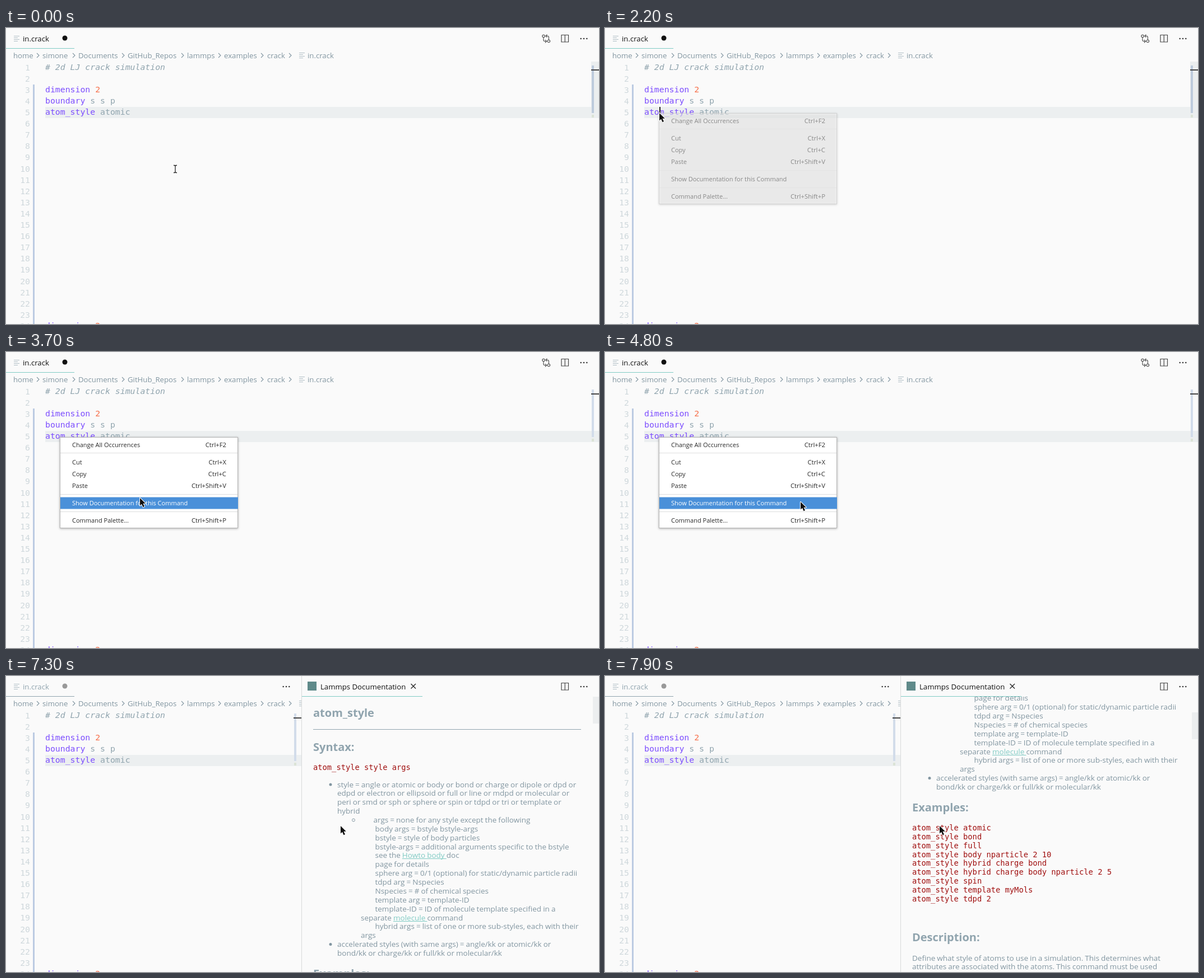
An HTML page with a canvas that plays this animation: 1058 by 529 pixels, repeating every 8000 ms.

```html
<!DOCTYPE html>
<html lang="en">
<head>
<meta charset="utf-8">
<title>Editor documentation panel</title>
<style>
html, body { margin: 0; height: 100%; overflow: hidden; background: #fafafa; }
canvas { display: block; width: 100vw; height: 100vh; }
</style>
</head>
<body>
<canvas id="stage" width="1058" height="529"></canvas>
<script>
const ctx = document.getElementById('stage').getContext('2d');
const LOOP = 8000, W = 1058, H = 529, SPLIT = 528;
const LINE = 20.1, TOP = 60.5, DOC_LINE = 15.87;
const BG = '#fafafa', GRAY = '#90a4ae', SLATE = '#8296a1', TEAL = '#80cbc4',
  PURPLE = '#7c4dff', ORANGE = '#f76d47', RED = '#a01010', DARK = '#333', ICON = '#444';
const SANS = '"Open Sans", "Noto Sans", sans-serif', MONO = '"DejaVu Sans Mono", monospace';
const UI = `13.2px ${SANS}`, BODY = `13.5px ${SANS}`, HEAD = `bold 20px ${SANS}`,
  CODE = `14.82px ${MONO}`, DOC_CODE = `13.75px ${MONO}`;

const crumbs = [[13, 'home'], [65, 'simone'], [129, 'Documents'], [217, 'GitHub_Repos'],
  [323, 'lammps'], [389, 'examples'], [466, 'crack'], [538, 'in.crack']];
const chevrons = [57, 121, 209, 315, 381, 457, 507];

const menu = [[166, 'Change All Occurrences', 'Ctrl+F2'], [197, 'Cut', 'Ctrl+X'],
  [218, 'Copy', 'Ctrl+C'], [239, 'Paste', 'Ctrl+Shift+V'],
  [270, 'Show Documentation for this Command', ''], [301, 'Command Palette...', 'Ctrl+Shift+P']];

// Square brackets mark links.
const syntax = [
  [591, 'style = angle or atomic or body or bond or charge or dipole or dpd or'],
  [591, 'edpd or electron or ellipsoid or full or line or mdpd or molecular or'],
  [591, 'peri or smd or sph or sphere or spin or tdpd or tri or template or'],
  [591, 'hybrid'],
  [655.5, 'args = none for any style except the following'],
  [658.5, 'body args = bstyle bstyle-args'],
  [658.5, 'bstyle = style of body particles'],
  [658.5, 'bstyle-args = additional arguments specific to the bstyle'],
  [658.5, 'see the [Howto body ]doc'],
  [658.5, 'page for details'],
  [658.5, 'sphere arg = 0/1 (optional) for static/dynamic particle radii'],
  [658.5, 'tdpd arg = Nspecies'],
  [658.5, 'Nspecies = # of chemical species'],
  [658.5, 'template arg = template-ID'],
  [658.5, 'template-ID = ID of molecule template specified in a'],
  [633, 'separate [molecule ]command'],
  [658.5, 'hybrid args = list of one or more sub-styles, each with their'],
  [633, 'args'],
  [591, 'accelerated styles (with same args) = angle/kk or atomic/kk or'],
  [591, 'bond/kk or charge/kk or full/kk or molecular/kk']];
const examples = ['atomic', 'bond', 'full', 'body nparticle 2 10', 'hybrid charge bond',
  'hybrid charge body nparticle 2 5', 'spin', 'template myMols', 'tdpd 2'];

// Time, x, y of the mouse hot spot; each holds until the next.
const mousePath = [[0, 302, 252], [700, 300, 262], [800, 290, 279], [900, 258, 286],
  [1000, 208, 270], [1100, 155, 218], [1200, 116, 175], [1300, 98, 155], [2200, 97, 152],
  [3200, 104, 160], [3300, 130, 185], [3400, 170, 215], [3500, 210, 245], [3600, 232, 258],
  [3700, 239, 261], [4200, 275, 265], [4300, 302, 268], [4600, 349, 268], [5700, 350, 269],
  [5900, 350, 272], [6200, 372, 272], [6300, 425, 271], [6400, 490, 270], [6500, 545, 269],
  [6600, 584, 268], [6700, 597, 268]];
const scrollPath = [[0, 0], [7400, 75], [7500, 149], [7700, 180], [7800, 255], [7900, 297]];
const caretToggles = [2200, 2800, 3300, 3700, 4200, 4800, 5300, 5700];

const held = (path, t) => path.filter(p => p[0] <= t).pop();
const lineTop = n => TOP + (n - 1) * LINE;

function rect(x, y, w, h, color) {
  ctx.fillStyle = color;
  ctx.fillRect(x, y, w, h);
}
function panel(x, y, w, h, fill, border) {
  rect(x, y, w, h, fill);
  ctx.shadowColor = 'transparent';
  ctx.strokeStyle = border;
  ctx.lineWidth = 1;
  ctx.strokeRect(x + 0.5, y + 0.5, w - 1, h - 1);
}
function text(str, x, y, font, color, align = 'left') {
  ctx.font = font;
  ctx.fillStyle = color;
  ctx.textAlign = align;
  ctx.fillText(str, x, y);
}
function dot(x, y, r, color) {
  ctx.fillStyle = color;
  ctx.beginPath();
  ctx.arc(x, y, r, 0, 7);
  ctx.fill();
}
function stroke(d, color, width = 1) {
  ctx.strokeStyle = color;
  ctx.lineWidth = width;
  ctx.stroke(new Path2D(d));
}
function clipped(x, y, w, h, draw) {
  ctx.save();
  ctx.beginPath();
  ctx.rect(x, y, w, h);
  ctx.clip();
  draw();
  ctx.restore();
}
function rich(str, x, y) {
  ctx.save();
  ctx.wordSpacing = '-0.45px';
  str.split(/[\[\]]/).forEach((part, i) => {
    text(part, x, y, BODY, i % 2 ? TEAL : SLATE);
    const w = ctx.measureText(part).width;
    if (i % 2) rect(x, Math.round(y + 1), w, 1, TEAL);
    x += w;
  });
  ctx.restore();
}

function fileIcon(x, y) {
  [10, 7, 10, 7].forEach((w, i) => rect(x, y + i * 3, w, 1, '#b0bec5'));
}
function ellipsis(x) {
  for (let i = -1; i < 2; i++) dot(x + i * 5.3, 19, 1.25, DARK);
}
function splitIcon() {
  stroke('M991 12.5h12.5v12.5h-12.5zM997.3 12.5v12.5', ICON, 1.2);
}
function compareIcon() {
  stroke('M961.3 14.5a2.2 2.2 0 1 1-4.4 0a2.2 2.2 0 1 1 4.4 0M959 16.7v4.5q0 2.5 2.5 2.5h2.5' +
    'M962 21l2.5 2.7l-2.5 2.7M970.6 23.5a2.2 2.2 0 1 1-4.4 0a2.2 2.2 0 1 1 4.4 0' +
    'M968.4 21.3v-4.5q0-2.5-2.5-2.5h-2.5M965.5 11.6l-2.5 2.7l2.5 2.7', ICON, 1.1);
}

function codeLine(n, parts) {
  let x = 70;
  for (const [str, color, style = ''] of parts) {
    text(str, x, Math.round(lineTop(n) + 14.1), style + CODE, color);
    x += ctx.measureText(str).width;
  }
}

function editor(right, active, sliderShown) {
  const ruler = right - 14;
  fileIcon(14, 14);
  text('in.crack', 30, 23.5, UI, active ? '#111' : GRAY);
  dot(105, 18, 4.5, active ? '#111' : '#999');
  rect(0, 36, 122, 1, active ? TEAL : GRAY);

  crumbs.forEach(([x, name]) => text(name, x, 53.5, UI, SLATE));
  chevrons.forEach(x => stroke(`M${x - 2} 45l4 4l-4 4`, SLATE, 1.1));
  fileIcon(523, 44);

  rect(70, Math.round(lineTop(5)), right - 70, 20, '#eceff0');
  rect(48, Math.round(lineTop(3)), 3, H, '#bccbe2');
  for (let n = 1; n <= 24; n++)
    text(n, 43, Math.round(lineTop(n) + 15.1), CODE, '#cfd8dc', 'right');

  codeLine(1, [['# 2d LJ crack simulation', GRAY, 'italic ']]);
  codeLine(3, [['dimension ', PURPLE], ['2', ORANGE]]);
  codeLine(4, [['boundary ', PURPLE], ['s s p', GRAY]]);
  codeLine(5, [['atom_style ', PURPLE], ['atomic', GRAY]]);
  codeLine(24, [['dimension ', PURPLE], ['2', ORANGE]]);

  if (sliderShown) rect(ruler, 60, 14, 92, '#ebeeef');
  rect(ruler + 1, 67, 4, 85, sliderShown ? '#bdcbdc' : '#d2dcea');
  rect(ruler + 1, 155, 4, 5, '#dbe3d6');
  rect(ruler, 74, 14, 2, ICON);
}

function hoverCard(alpha) {
  ctx.save();
  ctx.globalAlpha = alpha;
  rect(70, 141, 89, 19, 'rgba(128,203,196,.15)');
  panel(71, 162, 701, 263, BG, '#dfe6e9');
  text('atom_style style args', 82, 181, DOC_CODE, RED);
  syntax.slice(0, 14).forEach(([x, str], i) => rich(str, x - 490, 206 + i * DOC_LINE));
  ctx.restore();
}

function contextMenu(alpha, mouseX, mouseY) {
  ctx.save();
  ctx.globalAlpha = alpha;
  ctx.shadowColor = 'rgba(0,0,0,.3)';
  ctx.shadowBlur = 4;
  ctx.shadowOffsetY = 1;
  panel(96, 152, 318, 163, '#fff', '#b4b4b4');
  [180, 254, 285].forEach(y => rect(97, y, 316, 1, '#dedede'));
  for (const [y, label, keys] of menu) {
    const hot = mouseX > 97 && Math.abs(y - mouseY) <= 10;
    if (hot) rect(97, y - 10.5, 317, 21, '#4a90d9');
    const color = hot ? '#fff' : '#2a2a2a';
    text(label, 118, y + 4, `11px ${SANS}`, color);
    text(keys, 393, y + 4, `11.3px ${SANS}`, color, 'right');
  }
  ctx.restore();
}

function documentation(scroll) {
  ctx.translate(0, -scroll);
  text('atom_style', 548, 73, HEAD, GRAY);
  rect(548, 95, 478, 1, GRAY);
  text('Syntax:', 548, 134, HEAD, GRAY);
  text('atom_style style args', 548, 167.5, DOC_CODE, RED);
  syntax.forEach(([x, str], i) => rich(str, x, 198.5 + i * DOC_LINE));
  dot(579, 194, 2.5, SLATE);
  dot(579, 479.5, 2.5, SLATE);
  stroke('M622.5 257.5a2.5 2.5 0 1 1-5 0a2.5 2.5 0 1 1 5 0', SLATE);
  text('Examples:', 548, 538.5, HEAD, GRAY);
  examples.forEach((args, i) =>
    text('atom_style ' + args, 548, 573 + i * DOC_LINE, DOC_CODE, RED));
  text('Description:', 548, 771, HEAD, GRAY);
  rich('Define what style of atoms to use in a simulation. This determines what', 548, 805.5);
  rich('attributes are associated with the atoms. This command must be used', 548, 821.4);
}

function docPanel(t) {
  rect(527, 0, 1, H, '#d8dadb');
  rect(538, 10, 16, 16, '#5f8a8a');
  text('Lammps Documentation', 561, 23.5, UI, '#111');
  stroke('M722.5 14l8.5 8.5M731 14l-8.5 8.5', '#222', 1.3);
  rect(528, 36, 215, 1, TEAL);
  splitIcon();
  ellipsis(1031);
  if (t < 6900) return;
  const scroll = held(scrollPath, t)[1];
  clipped(SPLIT, 37, W - SPLIT, H - 37, () => documentation(scroll));
  rect(1047, 37 + scroll * 0.094, 11, 48, '#eceeef');
}

function pointer(x, y, isArrow) {
  ctx.save();
  ctx.translate(x, y);
  ctx.lineJoin = 'round';
  if (isArrow) {
    const shape = 'M0 0v13.5l3-2.8l2.5 5.5l2.5-1.1l-2.5-5.3h4.3z';
    stroke(shape, '#fff', 2);
    ctx.fillStyle = '#111';
    ctx.fill(new Path2D(shape));
  } else {
    const shape = 'M-3-6.5h2l1 1l1-1h2M0-5.5v11M-3 6.5h2l1-1l1 1h2';
    stroke(shape, '#fff', 3);
    stroke(shape, '#222', 1.3);
  }
  ctx.restore();
}

function draw(t) {
  const [, x, y] = held(mousePath, t);
  const split = t >= 5900;
  rect(0, 0, W, H, BG);
  if (split) {
    clipped(0, 0, 527, H, () => editor(527, false, t < 6700));
    ellipsis(500);
    docPanel(t);
  } else {
    editor(W, true, t < 2800);
    compareIcon();
    splitIcon();
    ellipsis(1031);
    if (t >= 1500 && t < 2200) hoverCard(Math.min(1, (t - 1400) / 300));
    if (caretToggles.filter(at => at <= t).length % 2) rect(97, 141, 2, 11, '#222');
    if (t >= 2200) contextMenu(t < 2300 ? 0.5 : 1, x, y);
  }
  pointer(x, y, (t >= 2200 && !split) || x > SPLIT);
}

function frame() {
  draw(Math.floor(performance.now() % LOOP / 100) * 100);
  requestAnimationFrame(frame);
}
frame();
</script>
</body>
</html>
```
